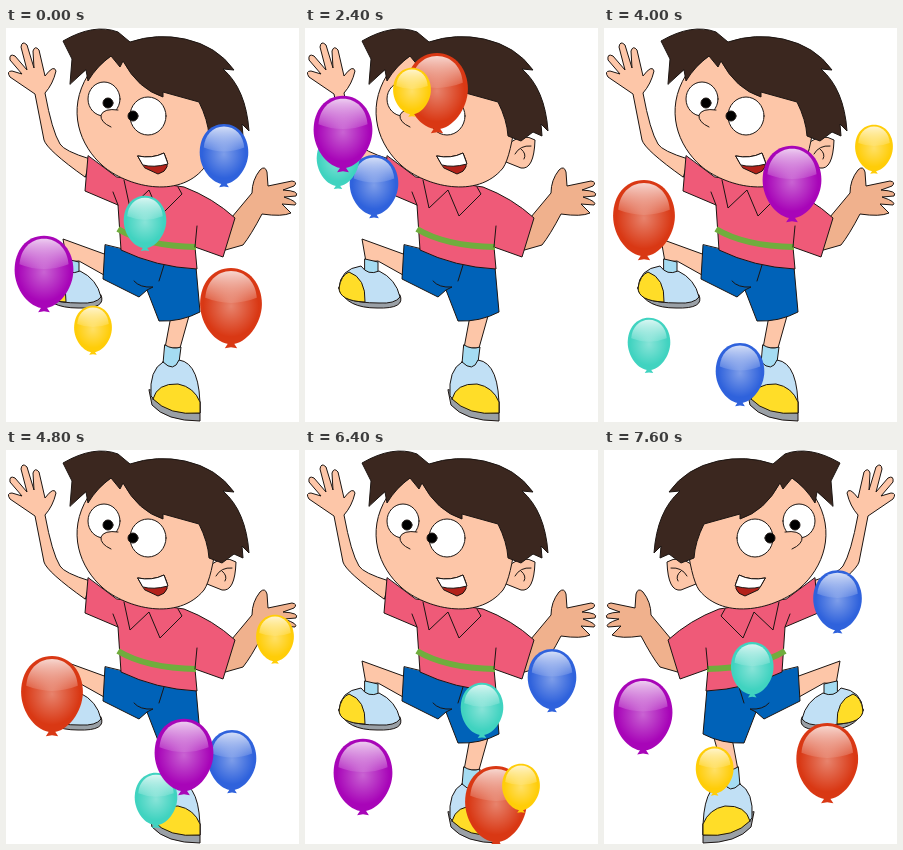
Animation of 293 by 394 pixels, one loop 8 s. Source, as an HTML page:

```html
<!DOCTYPE html>
<html lang="en">
<head>
<meta charset="utf-8">
<title>Dancing boy with balloons</title>
<style>
  html, body { margin: 0; width: 100%; height: 100%; overflow: hidden; background: #fff; }
  svg { display: block; width: 100vw; height: 100vh; }
  #boy { stroke: #1c1512; stroke-linejoin: round; stroke-linecap: round; }
  .skin { fill: #fdc6a8; }
  .shaded { fill: #f0b18d; }
  .shirt { fill: #ef5a78; }
  .stripe { fill: none; stroke: #70ad3d; stroke-width: 6; stroke-linecap: butt; }
  .shorts { fill: #0062b8; }
  .sock { fill: #a5dcf2; }
  .shoe { fill: #c1e0f5; }
  .toe { fill: #ffdd28; }
  .sole { fill: #9aa0a6; }
  .hair { fill: #3b271f; }
  .white { fill: #fff; }
  .mouth { fill: #b3221a; }
  .line { fill: none; }
</style>
</head>
<body>
<svg viewBox="0 0 293 394">
  <defs>
    <linearGradient id="shine" x2="0" y2="1">
      <stop stop-color="#fff" stop-opacity=".8"/>
      <stop offset="1" stop-color="#fff" stop-opacity=".1"/>
    </linearGradient>
    <radialGradient id="glow">
      <stop stop-color="#fff" stop-opacity=".38"/>
      <stop offset="1" stop-color="#fff" stop-opacity="0"/>
    </radialGradient>
    <g id="balloon">
      <path d="M-2 35L-6 41L0 40L6 41L2 35Z"/>
      <path d="M0-37C18-37 30-21 30-2S15 37 0 37S-30 18-30-2S-18-37 0-37Z"/>
      <ellipse rx="27" ry="30" fill="url(#glow)"/>
      <path fill="url(#shine)" d="M0-34C14-34 24-23 25-8Q0 2-25-8C-24-23-14-34 0-34Z"/>
    </g>
  </defs>

  <g id="boy">
    <!-- raised leg -->
    <path class="skin" d="M101 227L57 211L61 234L73 233L98 247Z"/>
    <path class="sock" d="M60 231L73 234V248H60Z"/>
    <path class="sole" d="M35 262Q42 280 72 280Q101 281 95 267Z"/>
    <path class="shoe" d="M34 260Q35 241 56 238Q63 248 74 243Q91 251 95 269Q90 276 74 275Q34 275 34 260Z"/>
    <path class="toe" d="M34 260Q36 247 44 244Q61 250 60 274Q34 273 34 260Z"/>

    <!-- standing leg -->
    <path class="skin" d="M165 288L159 320H174L183 288Z"/>
    <path class="sock" d="M159 317Q167 322 175 319L172 342L157 340Z"/>
    <path class="sole" d="M143 362L146 377Q160 393 194 393V374Z"/>
    <path class="shoe" d="M157 334Q143 342 145 368Q160 387 194 385Q195 335 173 332Q168 345 157 334Z"/>
    <path class="toe" d="M147 371Q151 355 172 356Q188 359 194 374V385Q163 388 147 371Z"/>

    <!-- arms -->
    <path class="skin" d="M84 131Q58 123 54 116Q46 103 39 65Q47 56 50 43Q48 36 39 48L33 22Q29 17 27 23L28 40L21 17Q16 12 15 19L21 42L9 28Q3 25 4 32L16 46L6 43Q0 43 4 49L29 66L38 112Q41 122 79 149Z"/>
    <path class="shaded" d="M216 223L237 217Q245 207 256 186Q276 189 285 185L276 176L289 177Q293 174 278 169L290 168Q294 163 277 162L288 158Q292 154 286 153L262 158L261 144Q259 137 254 142Q246 152 246 165L221 195Z"/>

    <path class="shorts" d="M99 217L97 251L133 269L141 262L153 293Q175 294 194 284L190 239Z"/>
    <path class="line" d="M128 253Q134 260 147 259L141 262M158 237L153 253"/>

    <path class="shirt" d="M82 128L79 163L112 177L115 222Q150 239 191 241L189 219L217 229L229 190Q207 170 178 159L111 149Z"/>
    <path class="stripe" d="M112 201Q140 218 190 219"/>
    <path class="line" d="M189 219L191 198M112 177L107 164M118 152L124 180L143 162L154 188L176 166L172 159"/>

    <!-- head -->
    <path class="skin" d="M206 114Q218 105 230 112Q229 142 216 140L201 134Z"/>
    <path class="line" d="M210 126Q215 117 226 118M216 121Q222 126 219 131"/>
    <path class="skin" d="M82 47C60 82 74 118 97 138S172 172 198 140Q206 128 211 86L173 42L111 23Z"/>
    <path class="hair" d="M64 56L66 31L57 13Q88-5 112 4L124 14Q151 5 179 11Q211 18 228 42L217 41Q240 61 243 103L236 96L237 108L228 104L216 113L203 108Q202 92 193 74L157 64V69Q132 61 117 33L114 39L105 28Q91 38 82 53L80 42Z"/>
    <ellipse class="white" cx="98" cy="71" rx="16" ry="17"/>
    <ellipse class="white" cx="142" cy="88" rx="18" ry="19"/>
    <circle cx="102" cy="75" r="5"/>
    <circle cx="127" cy="88" r="5"/>
    <path class="skin" d="M112 82Q98 80 95 87Q94 94 105 99"/>
    <path class="mouth" d="M132 128Q146 131 158 125Q167 142 152 146L139 140Z"/>
    <path class="white" d="M132 128Q146 131 158 125L162 136Q147 140 137 137Z"/>
  </g>
  <g id="balloons"></g>
</svg>
<script>
  const STEP = 400, COUNT = 20;
  const keySteps = [0, 3, 6, 10, 12, 16], n = keySteps.length;

  // Back to front; each path gives the centre at the key steps.
  const balloons = [
    { color: '#2f62dc', size: .81, path: '218,126 130,67 69,157 136,345 226,310 247,229' },
    { color: '#40d3c0', size: .71, path: '139,194 127,64 33,132 45,316 150,349 177,259' },
    { color: '#d93814', size: 1.03, path: '225,278 212,130 132,63 40,190 46,244 191,354' },
    { color: '#a805b8', size: .98, path: '38,244 38,204 38,104 188,154 178,305 58,325' },
    { color: '#ffcd08', size: .63, path: '87,301 87,222 107,63 270,120 269,188 216,337' }
  ];

  // Smooth closed curve through the key values.
  const time = i => keySteps[(i + n) % n] + COUNT * Math.floor(i / n);
  function curve(values, step) {
    const value = i => values[(i + n) % n];
    const slope = (a, b) => (value(b) - value(a)) / (time(b) - time(a));
    const tangent = i => {
      const before = time(i) - time(i - 1), after = time(i + 1) - time(i);
      return (after * slope(i - 1, i) + before * slope(i, i + 1)) / (before + after);
    };
    const i = keySteps.findLastIndex(k => k <= step);
    const span = time(i + 1) - time(i), u = (step - time(i)) / span, v = 1 - u;
    return v * v * (1 + 2 * u) * value(i) + u * u * (3 - 2 * u) * value(i + 1)
      + span * u * v * (v * tangent(i) - u * tangent(i + 1));
  }

  const boy = document.getElementById('boy');
  for (const b of balloons) {
    const points = b.path.split(' ').map(p => p.split(',').map(Number));
    b.axes = [0, 1].map(axis => points.map(p => p[axis]));
    b.node = document.createElementNS('http://www.w3.org/2000/svg', 'use');
    b.node.setAttribute('href', '#balloon');
    b.node.setAttribute('fill', b.color);
    document.getElementById('balloons').append(b.node);
  }

  function draw() {
    const step = Math.floor(performance.now() / STEP) % COUNT;
    boy.setAttribute('transform', step % 2 ? 'translate(293) scale(-1 1)' : '');
    for (const b of balloons) {
      const [x, y] = b.axes.map(values => curve(values, step));
      b.node.setAttribute('transform', `translate(${x} ${y}) scale(${b.size})`);
    }
    requestAnimationFrame(draw);
  }
  draw();
</script>
</body>
</html>
```
